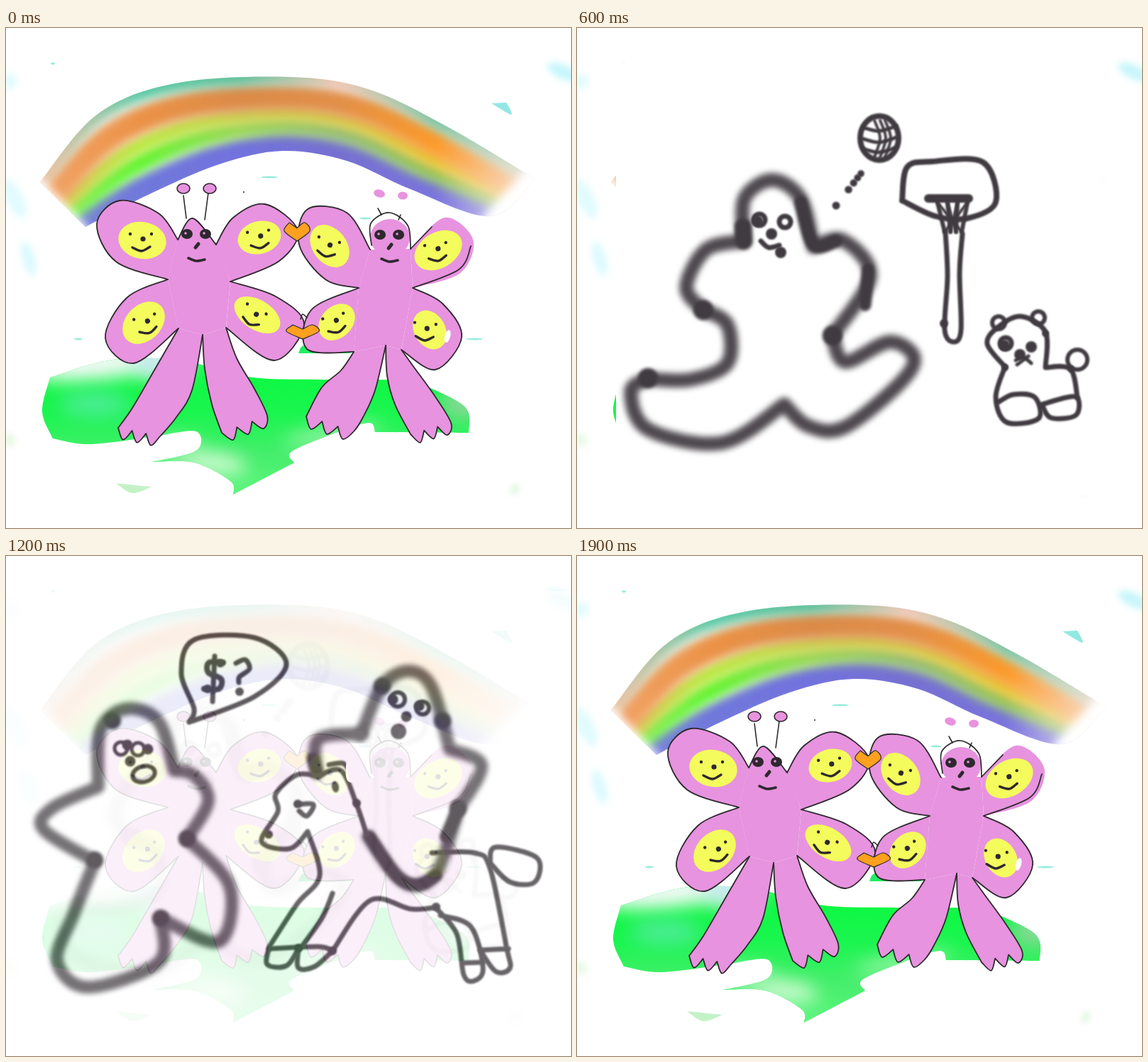
Recreate the animation shown at these times as an HTML page with a canvas. Size 796 by 704 pixels, loop 2 s.

```html
<!DOCTYPE html>
<html lang="en">
<head>
<meta charset="utf-8">
<title>Butterflies, basketball and horse</title>
<style>
html, body { margin: 0; width: 100%; height: 100%; overflow: hidden; background: #fff; }
canvas { display: block; }
</style>
</head>
<body>
<canvas id="stage" width="796" height="704"></canvas>
<script>
const W = 796, H = 704;
const INK = '#403b40', PEN = '#2d282e', PINK = '#e793df', YELLOW = '#f4fb5c', ORANGE = '#ffa01e';
const stage = document.getElementById('stage').getContext('2d');
let g;

function layer(x, y, width, height, draw) {
  const canvas = document.createElement('canvas');
  canvas.width = W;
  canvas.height = H;
  g = canvas.getContext('2d');
  g.lineCap = g.lineJoin = 'round';
  g.fillStyle = '#fff';
  g.fillRect(x, y, width, height);
  draw();
  return canvas;
}

const points = text => text.trim().split(/\s+/).map(p => p.split(',').map(Number));
const between = (a, b, t) => a.map((v, i) => v + (b[i] - v) * t);
const blur = px => { g.filter = px ? `blur(${px}px)` : 'none'; };

// Smooth line through the points; "|" makes a corner.
function curve(text) {
  const path = new Path2D();
  let last;
  for (const part of text.split('|')) {
    const pts = points(part);
    if (last) pts.unshift(last);
    else path.moveTo(...pts[0]);
    for (let i = 1; i < pts.length; i++) {
      const a = pts[i - 1], b = pts[i], before = pts[i - 2] || a, after = pts[i + 1] || b;
      path.bezierCurveTo(
        a[0] + (b[0] - before[0]) / 6, a[1] + (b[1] - before[1]) / 6,
        b[0] - (after[0] - a[0]) / 6, b[1] - (after[1] - a[1]) / 6, ...b);
    }
    last = pts[pts.length - 1];
  }
  return path;
}

function line(text, width, color = INK) {
  g.lineWidth = width;
  g.strokeStyle = color;
  g.stroke(curve(text));
}

function shape(text, color, width = 0) {
  g.fillStyle = color;
  g.fill(curve(text));
  if (width) line(text, width, PEN);
}

function oval(x, y, rx, ry, color = INK, turn = 0, width = 0) {
  g.beginPath();
  g.ellipse(x, y, rx, ry, turn * Math.PI / 180, 0, 7);
  g.lineWidth = width;
  g.fillStyle = g.strokeStyle = color;
  width ? g.stroke() : g.fill();
}

const dot = (x, y, r, color) => oval(x, y, r, r, color);
const ring = (x, y, r, width) => oval(x, y, r, r, INK, 0, width);
const dots = (r, text) => points(text).forEach(([x, y]) => dot(x, y, r));

function within(text, draw) {
  g.save();
  g.clip(curve(text));
  draw();
  g.restore();
}

function ramp(x0, y0, x1, y1, colors) {
  const gradient = g.createLinearGradient(x0, y0, x1, y1);
  colors.forEach((color, i) => gradient.addColorStop(i / (colors.length - 1), color));
  return gradient;
}

function rainbow() {
  const outer = points('48,217 128,122 238,78 400,69 510,86 620,138 745,212');
  const inner = points('112,280 200,235 300,192 390,173 480,187 570,227 683,265');
  const arch = t => outer.map((p, i) => between(p, inner[i], t));
  const band = (t, width, ...colors) => line(arch(t).join(' '), width, ramp(50, 0, 745, 0, colors));
  within(`${arch(0).join(' ')} | ${arch(1).reverse().join(' ')}`, () => {
    blur(7);
    band(.93, 42, '#7f8adb', '#7078da', '#7272dd', '#7670d2', '#7a74de', '#f1eaf7');
    band(.66, 28, '#8cf06a', '#62f532', '#98d85a', '#93bd78', '#8fc260', '#f3eee8');
    band(.5, 24, '#dcc85a', '#b9ea42', '#cbd352', '#d6cc50', '#e8c93c', '#f8ece0');
    band(.27, 38, '#f2a468', '#eb9246', '#dc8b48', '#e28f4a', '#fb9b2c', '#f9e4da');
    band(0, 24, '#edc0a0', '#5ac8a4', '#5cbf98', '#efc6b4', '#7cc4a0', '#f8e4dc');
    line('42,222 105,288', 24, '#fff');
    line('755,205 690,275', 40, '#fff');
  });
}

function meadow() {
  within(`62,492 | 150,467 250,466 | 340,491 440,495 570,495 | 645,532 652,570 | 520,569 | 512,556 470,568 403,596 406,612
    | 320,657 | 316,638 265,612 205,611 | 268,595 268,568 215,574 | 120,586 66,578 | 51,540 62,492`, () => {
    g.fillStyle = ramp(0, 490, 0, 655, ['#0df842', '#1cf550', '#45ee6c', '#5cf57c']);
    g.fillRect(0, 440, W, 230);
    blur(13);
    oval(130, 472, 95, 24, '#f2f9f6', -6);
    oval(222, 470, 45, 26, '#c8ebee');
    oval(125, 530, 50, 18, '#4bec94');
    oval(290, 612, 50, 15, '#d4fbd6', 8);
    oval(235, 592, 40, 14, '#a0f2b0');
    oval(460, 572, 70, 10, '#a8f5b4', -10);
    oval(640, 530, 30, 22, '#8bd798', 20);
  });
  shape('412,458 425,446 488,458 | 412,458', '#20ee62');
  shape('155,641 205,646 | 178,655 155,641', '#c4f2c7');
}

function sky() {
  const wisp = (x, y, w) => oval(x, y, w, 1.5, '#98ecdc');
  wisp(371, 210, 12);
  wisp(506, 268, 8);
  wisp(660, 438, 12);
  wisp(102, 438, 6);
  wisp(66, 50, 3);
  shape('684,106 705,105 | 712,122 684,106', '#93e8e2');
  dot(335, 231, 1, PEN);
  dot(642, 237, 1, PEN);
  blur(5);
  oval(12, 240, 12, 30, '#e2fbff', -25);
  oval(32, 325, 9, 25, '#dcfaff', -15);
  oval(6, 75, 9, 12, '#e2fbff');
  oval(785, 62, 24, 10, '#c8f6fb', 25);
  oval(5, 580, 8, 10, '#e6f9e4', -30);
  oval(717, 649, 3, 8, '#c0f0c4', 20);
  blur(0);
}

function limb(text) {
  shape(text, PINK, 1.8);
}

// Leg with three round toes between the points a and b.
function leg(down, a, b, up) {
  const length = Math.hypot(b[0] - a[0], b[1] - a[1]);
  const out = [(b[1] - a[1]) / length * 15, (a[0] - b[0]) / length * 15];
  let toes = `${a}`;
  for (let i = 0; i < 3; i++) {
    const tip = between(a, b, (i + .5) / 3).map((v, k) => v + out[k]);
    toes += ` ${tip} ${between(a, b, (i + 1) / 3)} |`;
  }
  limb(`${down} ${toes} ${up}`);
}

// Yellow wing spot; its features sit dx from the middle, turned by tilt.
function spot(x, y, rx, ry, turn, dx, tilt) {
  oval(x, y, rx, ry, YELLOW, turn);
  g.save();
  g.translate(x + dx, y);
  g.rotate(tilt * Math.PI / 180);
  dot(-16, -9, 2.2, PEN);
  dot(14, -9, 2.2, PEN);
  dot(2, -2, 3.6, PEN);
  line('-13,10 0,15 12,9', 3.4, PEN);
  g.restore();
}

function head(x, y) {
  for (const side of [-13, 13]) {
    oval(x + side, y, 8, 7, PEN);
    dot(x + side - 2, y - 1, 1.8, PINK);
  }
  line(`${x + 3},${y + 14} ${x - 1},${y + 19}`, 5, PEN);
  line(`${x - 11},${y + 34} ${x},${y + 38} ${x + 12},${y + 36}`, 3.6, PEN);
}

function heart(x, y, rx, ry) {
  shape(`${x},${y + ry} ${x - rx},${y - ry * .1} ${x - rx * .6},${y - ry} | ${x},${y - ry * .4}
    | ${x + rx * .6},${y - ry} ${x + rx},${y - ry * .1} ${x},${y + ry}`, ORANGE, 1.2);
}

function leftButterfly() {
  shape('242,297 | 296,302 | 316,357 | 310,422 | 277,432 | 243,423 | 228,354 | 242,297', PINK);
  limb('242,298 215,261 160,243 128,276 155,329 228,354');
  limb('228,354 170,380 140,437 180,472 243,423');
  limb('316,357 385,328 411,285 365,248 320,267 296,305');
  limb('316,357 380,378 420,417 378,468 310,422');
  limb('242,298 263,268 296,305');
  leg('277,432 262,510 240,548', [217, 575], [158, 563], '178,535 210,480 243,423');
  leg('310,422 325,465 350,508', [368, 546], [304, 570], '290,530 280,480 277,432');
  line('254,268 250,236', 1.6, PEN);
  line('280,270 285,232', 1.6, PEN);
  for (const x of [250, 287]) {
    oval(x, 226, 9, 7, PINK);
    oval(x, 226, 9, 7, PEN, 0, 1.6);
  }
  head(268, 290);
  spot(192, 299, 34, 26, 10, -1, 0);
  spot(357, 295, 31, 23, -15, 0, -6);
  spot(194, 415, 34, 25, -45, 4, -15);
  spot(354, 404, 36, 21, 32, -4, 28);
}

function rightButterfly() {
  shape('513,312 | 570,311 | 573,366 | 557,453 | 535,447 | 490,456 | 497,366 | 513,312', PINK);
  limb('513,312 480,260 425,255 413,305 450,354 497,366');
  limb('497,366 430,397 424,452 490,456');
  limb('557,453 605,481 642,435 615,388 573,366');
  shape('573,366 640,345 658,298 618,267 570,311', PINK);
  line('573,366 638,340 655,307', 1.7, PEN);
  line('570,311 600,280', 1.7, PEN);
  oval(541, 295, 28, 26, PINK);
  line('515,306 514,275 540,260 566,278 570,311', 1.7, PEN);
  leg('535,447 520,510 503,548', [490, 568], [423, 547], '445,506 472,482 490,456');
  leg('557,453 575,478 604,518', [627, 556], [570, 572], '548,530 537,490 535,447');
  line('529,263 524,254', 1.6, PEN);
  line('553,270 556,263', 1.6, PEN);
  oval(526, 233, 8, 5.5, PINK, 15);
  oval(559, 236, 7, 5.5, PINK);
  head(540, 291);
  spot(456, 307, 33, 24, 52, -2, 15);
  spot(609, 313, 36, 25, -30, -2, -8);
  spot(466, 414, 29, 22, -45, -2, -15);
  spot(597, 425, 29, 22, 60, -6, 5);
  oval(622, 434, 4, 9, '#fff', 15);
}

const butterflies = layer(0, 0, W, H, () => {
  sky();
  rainbow();
  meadow();
  leftButterfly();
  rightButterfly();
  heart(410, 287, 18, 13);
  heart(418, 428, 23, 10);
  line('415,410 418,403 424,408', 1.5, PEN);
});

const basketball = layer(55, 49, 683, 609, () => {
  blur(4);
  line(`235,298 236,240 275,214 315,240 333,308 | 375,299 413,350 360,433
    | 378,470 440,442 475,465 450,505 375,563 325,560 292,530
    | 205,584 100,565 76,512 100,494 | 160,495 212,472 212,418 178,397 | 154,365 182,312 235,300`, 20, '#4e494e');
  blur(2);
  line('315,245 333,305 365,300', 18);
  line('234,280 235,300', 24);
  line('410,340 406,390', 17);
  dots(14, '178,397 360,433 100,493');

  blur(1.2);
  ring(257, 270, 8, 7);
  ring(293, 273, 8, 7);
  dots(8, '254,272 274,290 287,316');
  line('259,300 270,309 285,306', 7);

  oval(426, 155, 27, 31, INK, 0, 8);
  for (const bend of [-10, 6, 20]) {
    line(`403,${150 + bend} 426,${155 + bend} 450,${148 + bend}`, 5);
    line(`${424 + bend / 2},130 ${432 + bend / 2},155 ${424 + bend / 2},182`, 4);
  }
  for (let i = 0; i < 5; i++) dot(365 + 35 * Math.sqrt(i / 4), 250 - 45 * Math.sqrt(i / 4), 5.5 - i / 6);

  line('458,243 465,196 500,188 572,189 590,245 550,268 505,265 458,243', 8);
  line('495,240 552,240', 12);
  for (let i = 0; i < 4; i++) {
    line(`${508 + i * 14},246 ${518 + i * 8},287`, 6);
    line(`${508 + i * 14},246 ${542 - i * 8},287`, 4);
  }
  line('519,287 522,350 518,425 531,442 541,425 539,345 543,290', 7);
  dot(517, 416, 6);

  line('603,477 578,445 592,422 625,406 660,428 660,478 | 695,480 705,520', 7);
  line('603,477 590,520 605,555 650,550 645,520 615,516 595,526', 7);
  line('655,530 702,519 703,545 668,549 655,530', 7);
  ring(594, 415, 9, 6);
  ring(650, 408, 9, 6);
  ring(705, 467, 14, 6);
  ring(604, 444, 8, 7);
  dots(8, '602,447 640,449 624,460');
  dots(5, '603,478 660,430 696,480');
  line('618,468 628,463 640,472', 5);
  line('620,474 636,462', 5);
});

const horseRide = layer(0, 49, W, 612, () => {
  blur(3.5);
  const THICK = '#5b575b';
  line(`130,325 133,245 170,215 215,233 237,302 | 265,309 285,345 255,398 | 315,465 300,543 218,510
    | 215,572 115,607 72,570 95,505 125,430 | 53,385 65,355 130,325`, 18, THICK);
  line('500,252 530,183 568,162 600,185 625,272 | 670,295 637,357 | 610,440 580,464 550,450 510,395', 18, THICK);
  line('500,250 440,258 438,305', 18, THICK);
  blur(2);
  dots(12, '150,232 255,398 125,428 218,510 530,183 615,232 637,355');
  line('512,395 550,450 580,463 606,450', 17);
  line('637,357 620,395', 18);
  line('432,285 438,305', 17);

  blur(1.2);
  ring(162, 271, 9, 5);
  ring(186, 272, 9, 5);
  ring(552, 202, 10, 6);
  ring(587, 214, 9, 6);
  oval(194, 307, 16, 11, INK, -15, 6);
  dots(7.5, '171,266 200,272 175,289 545,202 582,211 564,226');
  dot(553, 247, 11, '#575357');

  line('258,234 265,215 247,165 265,118 350,115 395,152 350,198 258,234', 7);
  line('306,150 286,150 285,164 303,173 300,187 279,187', 8);
  line('294,141 291,205', 7);
  line('324,151 337,146 343,159 329,170 328,178', 7);
  dots(6, '329,191 302,151 284,187');

  const LINE = '#4b474b';
  const trace = text => line(text, 7, LINE);
  trace('440,310 410,308 380,335 383,360 360,402 400,412 425,388 | 442,450 410,490 371,550 | 368,575 395,577 412,553');
  trace('370,553 440,550 460,556 | 435,578 412,580 412,553');
  trace('460,475 445,510 415,552');
  trace('460,556 513,485 570,497 605,495 | 635,532 645,590 660,598 672,580 655,522 612,506');
  trace('600,418 660,418 682,440 705,550 710,580 690,585 668,555 | 708,553');
  trace('645,573 672,572');
  trace('682,432 690,410 748,425 745,459 710,459 682,432');
  trace('440,310 472,302 494,350 508,392');
  trace('455,294 475,292 486,306');
  trace('410,350 433,350 424,366 413,359');
  oval(464, 325, 5, 8, LINE, -10);
  dots(6, '411,349 412,552 370,392 494,348 606,494 460,556');
  blur(0);
  shape('482,264 | 512,264 | 512,320 | 490,320 479,310 482,264', '#fff');
});

function show(image, alpha) {
  stage.globalAlpha = alpha;
  stage.drawImage(image, 0, 0);
}

function frame(now) {
  const step = Math.floor(now % 2000 / 100);
  const ball = step < 8 ? Math.min(1, step / 6) : Math.max(0, (13 - step) / 6);
  const horse = step < 8 ? 0 : step < 14 ? (step - 7) / 6 : .93 * (19 - step) / 5;
  show(butterflies, 1);
  show(basketball, ball);
  show(horseRide, horse);
  requestAnimationFrame(frame);
}
requestAnimationFrame(frame);
</script>
</body>
</html>
```
